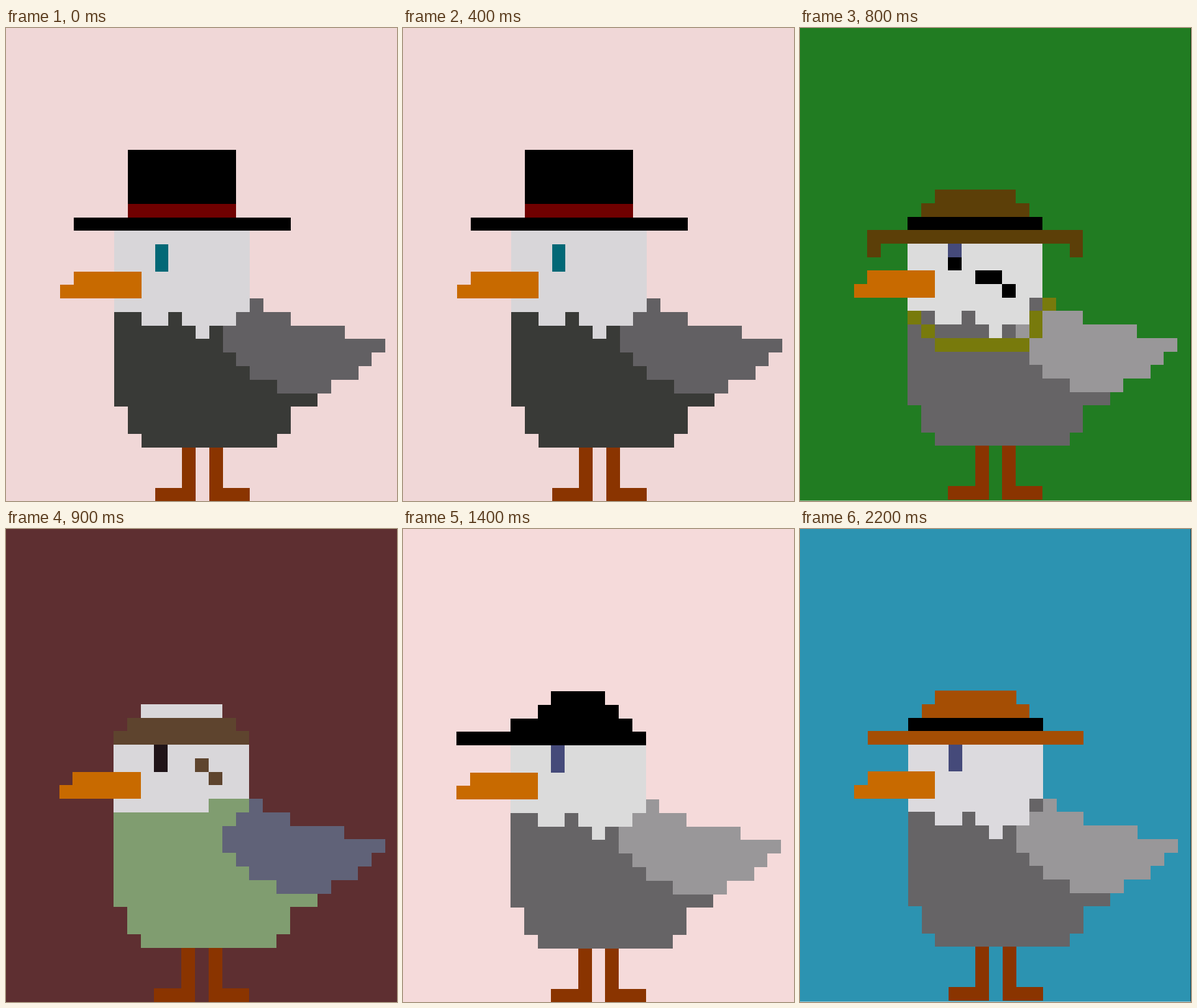
Recreate the animation shown at these times as an HTML page with a canvas. Size 600 px wide and 726 px high, loop 2.3 s.

```html
<!DOCTYPE html>
<html>
<head>
<meta charset="utf-8">
<style>
html, body { margin: 0; width: 100%; height: 100%; overflow: hidden; }
canvas { display: block; }
</style>
</head>
<body>
<canvas id="stage" width="600" height="726"></canvas>
<script>
const ctx = document.getElementById('stage').getContext('2d');
const MIDDLE = 13; // column the hats are centred on
const GREY = '#666466', SILVER = '#999799', NAVY = '#454a7a', BLACK = '#000';
let grid;

// All drawing helpers work in cells of the current grid.
function box(color, x, y, w = 1, h = 1) {
  const px = n => Math.round(grid.x + n * grid.w);
  const py = n => Math.round(grid.y + n * grid.h);
  ctx.fillStyle = color;
  ctx.fillRect(px(x), py(y), px(x + w) - px(x), py(y + h) - py(y));
}

const tier = (color, y, half, h) => box(color, MIDDLE - half, y, 2 * half, h);

// Fills an outline row by row, snapping each side to whole cells.
function blob(color, points) {
  const ys = points.map(p => p[1]);
  for (let row = Math.min(...ys); row < Math.max(...ys); row++) {
    const y = row + 0.5, hits = [];
    points.forEach(([x0, y0], i) => {
      const [x1, y1] = points[(i + 1) % points.length];
      if (y0 !== y1 && (y - y0) * (y - y1) <= 0)
        hits.push(x0 + (x1 - x0) * (y - y0) / (y1 - y0));
    });
    const left = Math.round(Math.min(...hits));
    box(color, left, row, Math.round(Math.max(...hits)) - left);
  }
}

function bird({ body, wing, head, eye, ruff = true }) {
  for (const x of [13, 15]) box('#8a3400', x, 31, 1, 4);
  for (const x of [11, 15]) box('#8a3400', x, 34, 3);
  blob(body, [[8, 21], [17, 21], [23, 27.5], [21.2, 28.5], [20, 31],
    [10, 31], [8.5, 28], [8, 28]]);
  box(head, 8, 15, 10, 6);
  blob(wing, [[18.4, 20], [21, 21.5], [28.2, 23.5], [26, 25.5], [23, 27],
    [21, 27], [18, 25.5], [16, 23.5], [16, 22.5]]);
  if (ruff) {
    box(head, 10, 21, 2);
    box(head, 13, 21, 4);
    box(head, 14, 22);
  }
  box('#c86a00', 5, 18, 5);
  box('#c86a00', 4, 19, 6);
  box(eye, 11, 16, 1, 2);
}

// A crown that widens by one cell on each side per row.
const crown = (y, colors) => colors.forEach((c, i) => tier(c, y + i, 3 + i));

function fedora(color) {
  crown(12, [color, color, BLACK]);
  tier(color, 15, 8);
}

function topHat() {
  tier(BLACK, 9, 4, 4);
  tier('#700000', 13, 4);
  tier(BLACK, 14, 8);
}

function ranger() {
  const felt = '#5c3f08', cord = '#787a0c';
  fedora(felt);
  for (const x of [5, 20]) box(felt, x, 16);
  box(BLACK, 11, 17);
  box(BLACK, 13, 18, 2);
  box(BLACK, 15, 19);
  box(GREY, 17, 20);
  for (const i of [0, 1]) box(cord, 8 + i, 21 + i);
  box(cord, 10, 23, 7);
  box(cord, 17, 21, 1, 2);
  box(cord, 18, 20);
}

function sparrow() {
  const brown = '#5e442e', green = '#809d70';
  crown(13, ['#d9d7da', brown, brown]);
  for (const i of [0, 1]) box(brown, 14 + i, 17 + i);
  box(green, 15, 20, 3);
}

function cap() {
  for (const i of [0, 1]) tier(BLACK, 12 + i, 2 + i);
  box(BLACK, 8, 14, 9);
  box(BLACK, 4, 15, 14);
}

function strawHat() {
  fedora('#a54e04');
  box(GREY, 17, 20);
}

const scenes = [
  { start: 0, bg: '#f0d7d7', grid: { x: 0, y: 0, w: 20.79, h: 20.76 }, dress: topHat,
    body: '#393a37', wing: '#626063', head: '#d8d6d9', eye: '#026876' },
  { start: 500, bg: '#217c22', grid: { x: 0, y: 0, w: 20.68, h: 20.69 }, dress: ranger,
    body: GREY, wing: SILVER, head: '#dcdcdc', eye: NAVY, edged: true },
  { start: 900, bg: '#5e2f31', grid: { x: -1.9, y: -1, w: 20.85, h: 20.76 }, dress: sparrow,
    body: '#809d70', wing: '#606278', head: '#d9d7da', eye: '#201418', ruff: false },
  { start: 1400, bg: '#f5dada', grid: { x: -1, y: 0, w: 20.75, h: 20.76 }, dress: cap,
    body: GREY, wing: SILVER, head: '#dbdbdb', eye: NAVY },
  { start: 1900, bg: '#2c93b1', grid: { x: 0.3, y: 0, w: 20.7, h: 20.69 }, dress: strawHat,
    body: GREY, wing: SILVER, head: '#dcdade', eye: NAVY, edged: true }
];

function draw(scene) {
  grid = scene.grid;
  ctx.fillStyle = scene.bg;
  ctx.fillRect(0, 0, 600, 726);
  bird(scene);
  scene.dress();
  if (scene.edged) {
    ctx.fillStyle = 'rgba(0, 0, 0, 0.5)';
    ctx.fillRect(599, 0, 1, 726);
    ctx.fillStyle = 'rgba(255, 255, 255, 0.5)';
    ctx.fillRect(0, 725, 600, 1);
  }
}

function frame() {
  const t = performance.now() % 2300;
  draw(scenes.findLast(s => t >= s.start));
  requestAnimationFrame(frame);
}
frame();
</script>
</body>
</html>
```
